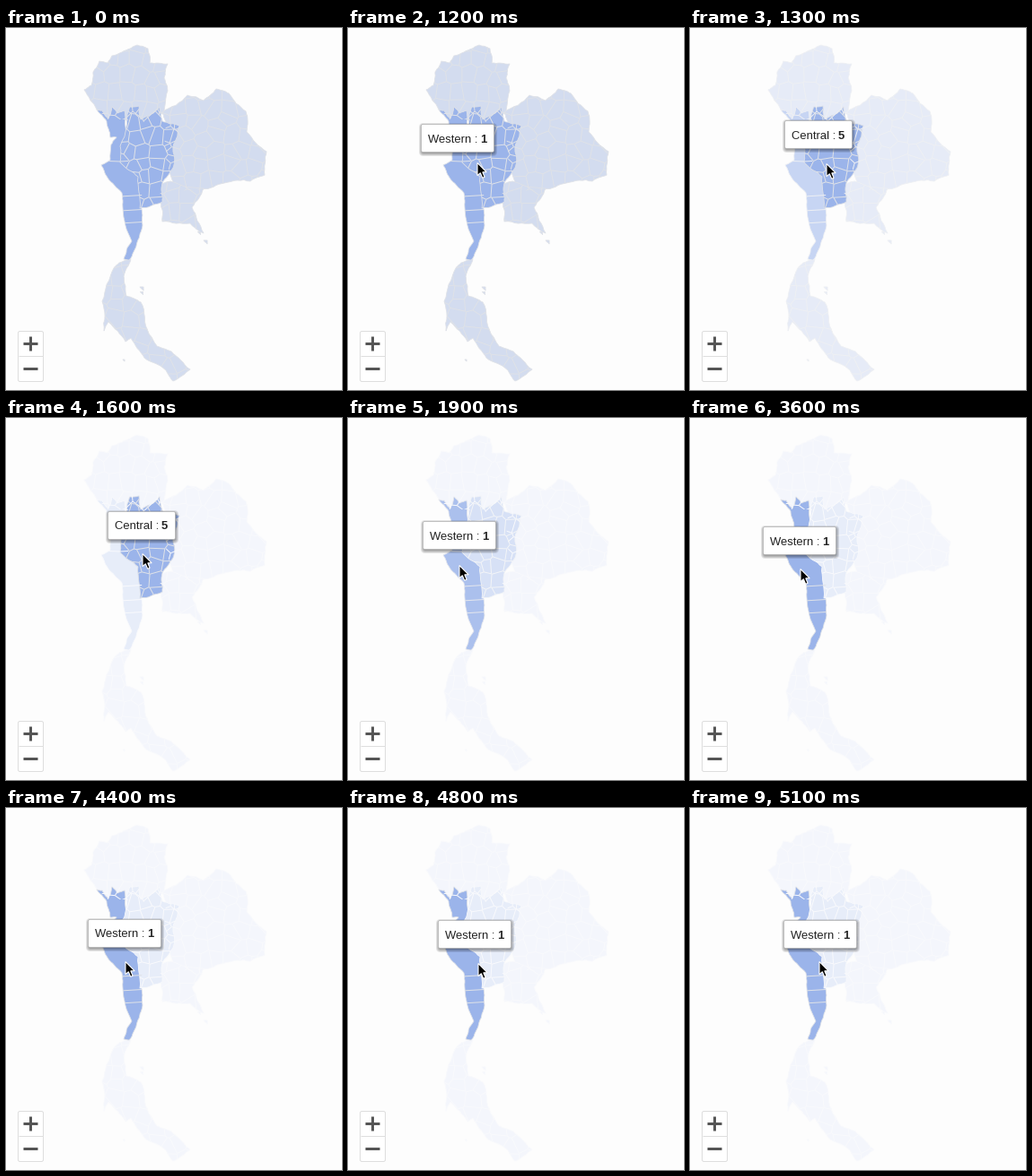
A matplotlib script for the animation above (5200 ms loop, 374 px wide and 404 px high).

```python
import random

import matplotlib.pyplot as plt
import numpy as np
from matplotlib.animation import FuncAnimation
from matplotlib.collections import LineCollection
from matplotlib.colors import to_rgb
from matplotlib.patches import FancyBboxPatch, Polygon
from matplotlib.tri import Triangulation

W, H, DPI = 374, 404, 100
FRAMES, STEP = 52, 100
PX = 72 / DPI
ENTER, SWAP = 12, 17  # frames where the pointer enters and changes region

PALE, PALE_DIM = "#d3dcef", "#f4f6fc"
BLUE, BLUE_DIM = "#9bb4ea", "#e7edf9"
LINE, LINE_DIM = "#dfe2e8", "#f9fafd"

# Corner points only; coast and border detail comes from rough()
NORTH = [(87, 69), (95, 64), (97, 49), (104, 37), (113, 39), (118, 31), (133, 25),
         (146, 19), (158, 23), (160, 39), (180, 40), (176, 56), (180, 70), (175, 95),
         (150, 106), (112, 102), (101, 91)]
NORTHEAST = [(174, 94), (202, 75), (220, 81), (234, 68), (248, 73), (267, 93),
             (268, 116), (290, 138), (288, 164), (272, 171), (243, 173), (218, 180),
             (187, 180), (178, 150), (178, 105)]
EAST = [(173, 174), (183, 171), (220, 179), (207, 200), (220, 229), (205, 218),
        (174, 216), (172, 194)]
SOUTH = [(126, 262), (139, 258), (131, 277), (134, 299), (150, 306), (159, 341),
         (168, 355), (184, 361), (205, 381), (186, 394), (178, 382), (154, 368),
         (139, 346), (133, 350), (114, 328), (109, 338), (107, 305), (120, 268)]
WESTERN = [(101, 91), (107, 92), (114, 101), (118, 88), (124, 95), (132, 92),
           (136, 150), (150, 167), (150, 198), (152, 220), (146, 239), (137, 259),
           (131, 258), (140, 238), (130, 201), (129, 184), (113, 167), (106, 153),
           (116, 147), (117, 130), (123, 122), (116, 122), (112, 104)]
CENTRAL = [(135, 96), (138, 88), (148, 87), (150, 102), (164, 95), (171, 88),
           (174, 104), (193, 109), (186, 132), (186, 156), (174, 173), (174, 194),
           (149, 201), (147, 166), (127, 150), (127, 132), (134, 110)]
ISLETS = [(215, 229, 1.5), (222, 239, 2), (151, 291, 2), (151, 296, 1.5), (131, 371, 1)]

# Pointer stops: frame, x, y
POINTER = np.array([(11, 123, 154), (12, 144, 150), (13, 152, 151), (17, 152, 151),
                    (18, 125, 162), (21, 123, 168), (36, 123, 168), (37, 132, 170),
                    (41, 137, 172), (43, 133, 171), (44, 133, 171), (49, 148, 173),
                    (51, 144, 171)]).T


def rough(points, rng, depth=3, bend=0.07):
    """Displace edge midpoints again and again for a natural outline."""
    for _ in range(depth):
        out = []
        for (x0, y0), (x1, y1) in zip(points, points[1:] + points[:1]):
            k = rng.uniform(-bend, bend)
            out += [(x0, y0), ((x0 + x1) / 2 - k * (y1 - y0),
                               (y0 + y1) / 2 + k * (x1 - x0))]
        points = out
    return points


def cell_borders(outline, size, seed):
    """Voronoi edges of a jittered grid, used as province borders."""
    rng = np.random.RandomState(seed)
    (x0, y0), (x1, y1) = np.min(outline, 0) - 2 * size, np.max(outline, 0) + 2 * size
    gx, gy = np.meshgrid(np.arange(x0, x1, size), np.arange(y0, y1, size * 1.1))
    pts = np.column_stack([gx.ravel(), gy.ravel()])
    pts += rng.uniform(-0.38, 0.38, pts.shape) * size
    tri = Triangulation(*pts.T)
    a, b, c = (pts[tri.triangles[:, i]] for i in range(3))
    b, c = b - a, c - a
    d = 2 * (b[:, 0] * c[:, 1] - b[:, 1] * c[:, 0])
    bb, cc = (b ** 2).sum(1), (c ** 2).sum(1)
    mid = a + np.column_stack([c[:, 1] * bb - b[:, 1] * cc,
                               b[:, 0] * cc - c[:, 0] * bb]) / d[:, None]
    return [(mid[i], mid[j]) for i, row in enumerate(tri.neighbors)
            for j in row if j > i]


def mix(dim, full, t):
    return tuple(np.array(to_rgb(dim)) * (1 - t) + np.array(to_rgb(full)) * t)


def ease_out(i, start, length):
    t = min(max((i - start) / length, 0), 1)
    return 1 - (1 - t) ** 3


def pointer_at(i):
    return [round(float(np.interp(i, POINTER[0], p))) for p in POINTER[1:]]


fig = plt.figure(figsize=(W / DPI, H / DPI), dpi=DPI, facecolor="#fdfdfd")
ax = fig.add_axes([0, 0, 1, 1])
ax.set(xlim=(0, W), ylim=(H, 0))
ax.axis("off")


class Region:
    def __init__(self, outline, full, dim, borders=()):
        self.full, self.dim = full, dim
        shape = rough(outline, random.Random(len(outline)))
        self.shape = ax.add_patch(Polygon(shape, lw=0.8 * PX, joinstyle="round"))
        self.lines = ax.add_collection(LineCollection(borders, linewidths=PX))
        self.lines.set_clip_path(self.shape)

    def show(self, t):
        line = mix(LINE_DIM, LINE, t)
        self.shape.set_facecolor(mix(self.dim, self.full, t))
        self.shape.set_edgecolor(line)
        self.lines.set_color(line)


pale = [Region(o, PALE, PALE_DIM, cell_borders(o, 15, seed))
        for seed, o in enumerate((NORTH, NORTHEAST, EAST, SOUTH))]
pale += [Region([(x - r, y - r), (x + r, y - r), (x + r, y + r)], PALE, PALE_DIM)
         for x, y, r in ISLETS]
western = Region(WESTERN, BLUE, BLUE_DIM,
                 [[(100, y), (127, y + 1), (160, y - 1)] for y in (148, 187, 203, 217)])
central = Region(CENTRAL, BLUE, BLUE_DIM, cell_borders(CENTRAL, 14, 8))


def box(x, y, w, h, r, **style):
    patch = FancyBboxPatch((x, y), w, h, boxstyle=f"round,pad=0,rounding_size={r}",
                           **style)
    return ax.add_patch(patch)


def bar(xs, ys, color="#555555", width=3):
    ax.plot(xs, ys, color=color, lw=width * PX, solid_capstyle="butt")


# Zoom buttons
box(13.5, 338.5, 28, 56, 2, fc="white", ec="#dedede", lw=PX)
bar([14, 41], [365.5, 365.5], "#dedede", 1)
for y in (351.5, 379.5):
    bar([19.5, 35.5], [y, y])
bar([27.5, 27.5], [343.5, 359.5])

# Tooltip and pointer
TIPS = {"Western": ("1", 81), "Central": ("5", 75)}
shadows = [box(0, 0, 1, 1, 2 + g, fc="black", ec="none", alpha=0.1, zorder=5)
           for g in range(4)]
tip = box(0, 0, 1, 1, 2, fc="white", ec="#a8a8a8", lw=0.6 * PX, zorder=6)
font = dict(family="Liberation Sans", size=13 * PX, color="#222222", zorder=7)
label = ax.text(0, 0, "", ha="left", **font)
value = ax.text(0, 0, "", ha="right", weight="bold", **font)
ARROW = np.array([(0, 0), (0, 14.2), (3.3, 11.2), (5.7, 16.8), (8.1, 15.8),
                  (5.8, 10.3), (10.2, 10.3)])
arrow = ax.add_patch(Polygon(ARROW, fc="black", ec="white", lw=1.1 * PX, zorder=8))
hover = [*shadows, tip, label, value, arrow]


def draw(i):
    leave = 1 - ease_out(i, ENTER, 4)
    swap = ease_out(i, SWAP, 5)
    for region in pale:
        region.show(leave)
    western.show(max(leave, swap))
    central.show(1 - swap)

    for artist in hover:
        artist.set_visible(i >= ENTER)
    name = "Central" if ENTER < i <= SWAP else "Western"
    number, width = TIPS[name]
    # The tooltip trails the pointer by one frame
    x, y = pointer_at(i - 1)
    x, y = x - width // 2 - 1.5, y - 46.5
    label.set_text(f"{name} :")
    value.set_text(number)
    label.set_position((x + 7.5, y + 20))
    value.set_position((x + width - 8.5, y + 20))
    tip.set_bounds(x, y, width, 31)
    for g, shadow in enumerate(shadows):
        shadow.set_bounds(x + 0.5 - g, y + 1.5 - g, width + 2 * g, 31 + 2 * g)
    arrow.set_xy(ARROW + pointer_at(i) + np.array([0, 0.5]))
    return hover


anim = FuncAnimation(fig, draw, frames=FRAMES, interval=STEP, repeat=True,
                     repeat_delay=0, blit=False)
plt.show()
```
